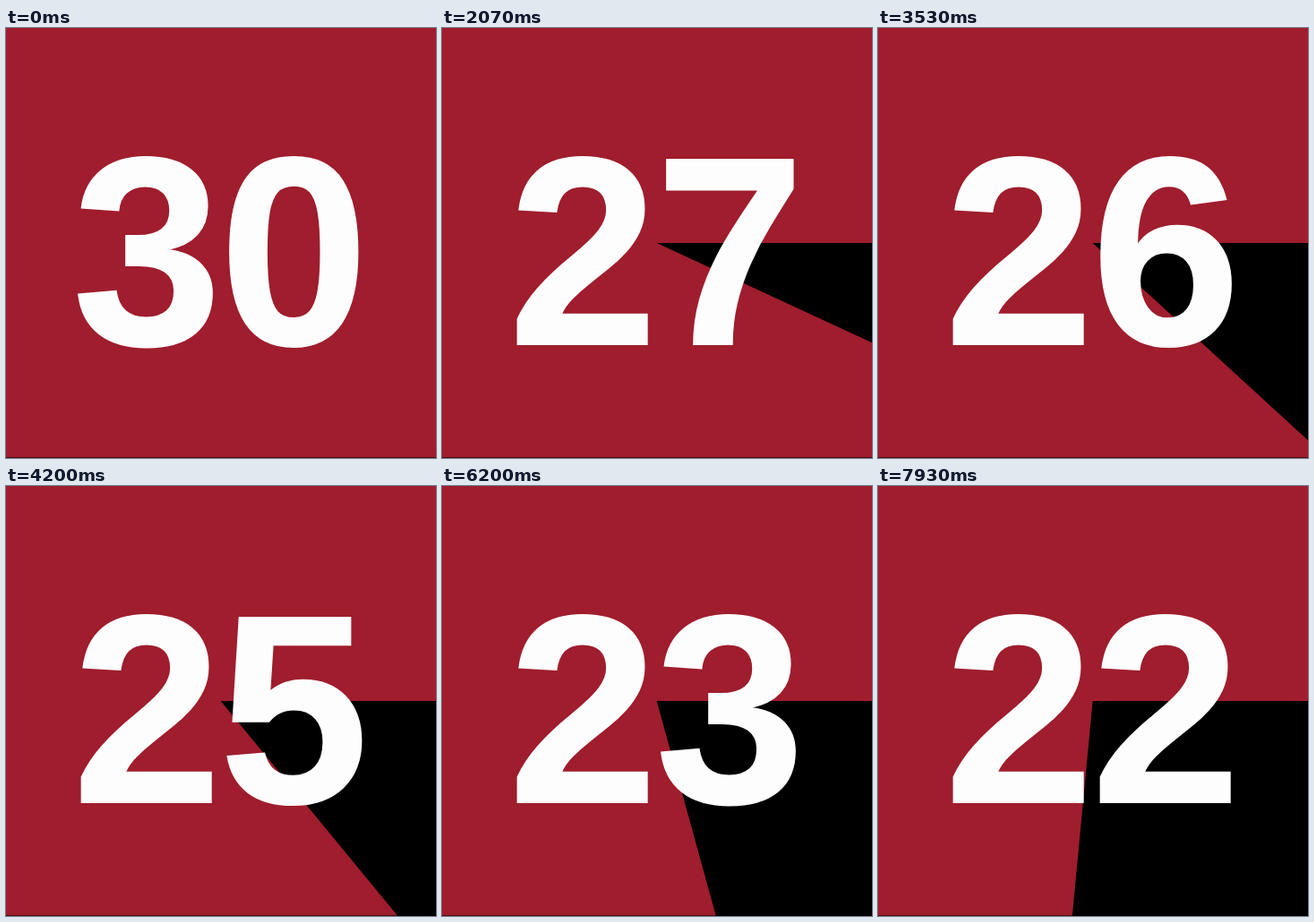
An HTML page that plays this animation: 480 px wide and 480 px high, repeating every 8000 ms.

```html
<!DOCTYPE html>
<html lang="en">
<head>
<meta charset="utf-8">
<title>Countdown</title>
<style>
  html, body {
    margin: 0;
    width: 100%;
    height: 100%;
    overflow: hidden;
    background: #9f1d2d;
  }
  svg {
    display: block;
    width: 100vw;
    height: 100vh;
  }
  text {
    font: bold 300px "Liberation Sans", Arial, Helvetica, sans-serif;
    text-anchor: middle;
    fill: #fdfdfd;
    stroke: #fdfdfd;
    stroke-width: 1.6px;
  }
</style>
</head>
<body>
<svg viewBox="0 0 480 480">
  <rect width="480" height="480" fill="#9f1d2d"/>
  <path id="wedge"/>
  <text id="number" x="157.5 321.5" y="353.3">30</text>
  <rect y="479" width="480" height="1" opacity=".5"/>
</svg>
<script>
  const LOOP = 8000;
  const FPS = 15;
  const START = 30;
  const DEGREES_PER_SECOND = 12.03;
  const CENTER = { x: 239.7, y: 240 };
  const RADIUS = 400;

  const wedge = document.getElementById('wedge');
  const number = document.getElementById('number');

  function draw(seconds) {
    const angle = seconds * DEGREES_PER_SECOND * Math.PI / 180;
    const x = CENTER.x + RADIUS * Math.cos(angle);
    const y = CENTER.y + RADIUS * Math.sin(angle);
    wedge.setAttribute('d',
      `M${CENTER.x} ${CENTER.y}h${RADIUS}A${RADIUS} ${RADIUS} 0 0 1 ${x} ${y}Z`);

    const label = String(Math.floor(START - seconds));
    if (number.textContent !== label) number.textContent = label;
  }

  const origin = performance.now();

  function tick() {
    // The small lead absorbs step times rounded to 10 ms.
    const time = (performance.now() - origin + 4) % LOOP;
    draw(Math.floor(time * FPS / 1000) / FPS);
    requestAnimationFrame(tick);
  }

  tick();
</script>
</body>
</html>
```
